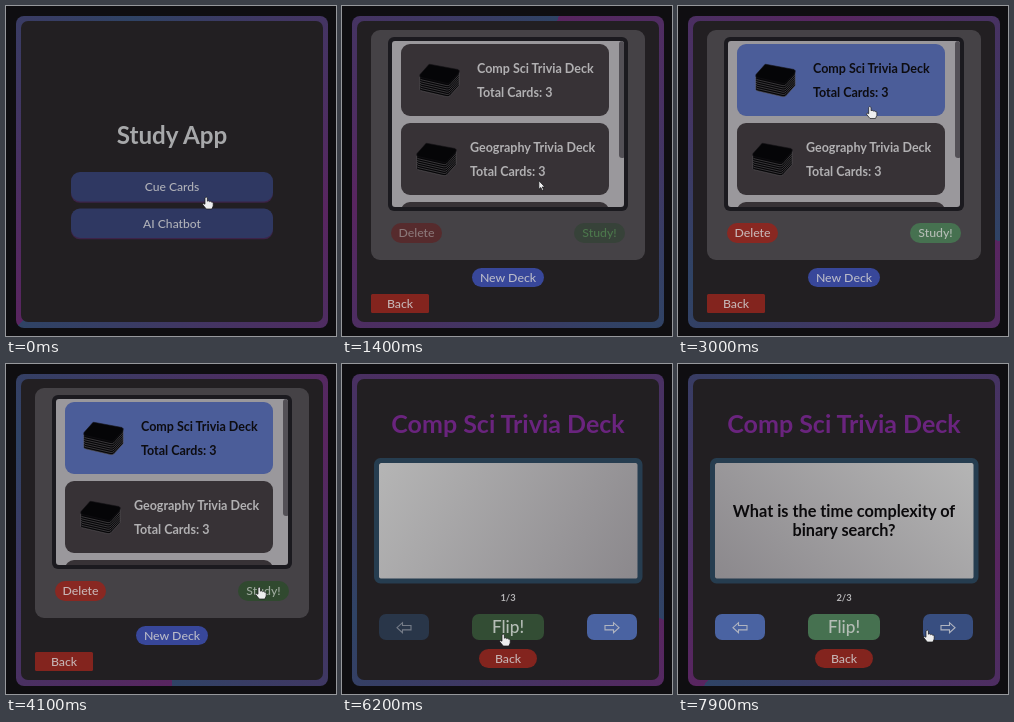
Recreate the animation shown at these times as an HTML page. Size 330x330 px, loop 8000 ms.

```html
<!DOCTYPE html>
<html lang="en">
<head>
<meta charset="utf-8">
<title>Study App</title>
<style>
  html, body { margin: 0; width: 100%; height: 100%; overflow: hidden; background: #0f0e11; }
  #frame, #inside, #paper { position: absolute; }
  #frame { left: 9.5px; top: 9.5px; width: 312.5px; height: 312px; border-radius: 8px; }
  #inside { left: 15px; top: 15px; width: 301.5px; height: 301px; border-radius: 7px; background: #221f22; }
  #paper { left: 37px; top: 99px; width: 258.5px; height: 115.5px; border-radius: 2px; }
  svg { position: absolute; left: 0; top: 0; width: 330px; height: 330px; display: block; }
  text { font-family: Lato, "Open Sans", sans-serif; font-variant-ligatures: none; }
</style>
</head>
<body>
<div id="frame"></div>
<div id="inside"></div>
<div id="paper"></div>
<svg id="stage" viewBox="0 0 330 330">
  <defs>
    <clipPath id="listClip"><rect x="50" y="35" width="232" height="166" rx="3"/></clipPath>
  </defs>
</svg>
<script>
const LOOP = 8000;
const HOME_AT = -3750, DECKS_AT = 1100, SELECT_AT = 2700, STUDY_AT = 4200;
const FLIP_AT = 6050, ANSWER_AT = 6400, NEXT_AT = 7350;
const TURN = 6000;

const stage = document.getElementById('stage');
const frame = document.getElementById('frame');
const paper = document.getElementById('paper');

function add(parent, tag, attrs, content) {
  const node = document.createElementNS('http://www.w3.org/2000/svg', tag);
  for (const key in attrs) node.setAttribute(key, attrs[key]);
  if (content) node.textContent = content;
  parent.appendChild(node);
  return node;
}
const group = (parent, attrs) => add(parent, 'g', attrs);
const box = (parent, x, y, width, height, rx, fill, more) =>
  add(parent, 'rect', { x, y, width, height, rx, fill, ...more });
const label = (parent, x, y, size, fill, content, weight = 500, anchor = 'middle') =>
  add(parent, 'text', { x, y, fill, 'font-size': size, 'font-weight': weight, 'text-anchor': anchor }, content);
const show = (node, on) => node.setAttribute('display', on ? 'inline' : 'none');
const paint = (node, fill) => node.setAttribute('fill', fill);

function button(parent, x, y, w, h, r, fill, content, size, color = '#b9b9bd') {
  return {
    shape: box(parent, x, y, w, h, r, fill),
    text: label(parent, x + w / 2, y + h / 2 + size * 0.36, size, color, content)
  };
}

// Home
const home = group(stage);
label(home, 166, 138, 24.2, '#a7a8aa', 'Study App', 700);
for (const [y, name] of [[166, 'Cue Cards'], [202.5, 'AI Chatbot']]) {
  box(home, 65, y + 0.8, 202, 30, 9, '#3d2347');
  button(home, 65, y, 202, 29.5, 9, '#2f3862', name, 12.1, '#b0b1b8');
}

// Deck list
const decks = group(stage);
box(decks, 29, 24, 274, 230, 9, '#454246');
box(decks, 46, 31, 240, 174, 6, '#1b1a1f');
box(decks, 50, 35, 232, 166, 3, '#9a989c');
const list = group(decks, { 'clip-path': 'url(#listClip)' });

function stackIcon(parent, x, y) {
  const icon = group(parent, { transform: `translate(${x} ${y})`, 'stroke-linejoin': 'round' });
  for (let i = 6; i >= 0; i--) {
    add(icon, 'path', {
      d: 'M12 1 L39 6 Q41 7 40 9 L31 19 Q30 20 28 20 L2 14 Q0 13 1 11 L9 2 Q10 0 12 1Z',
      transform: `translate(0 ${i * 2.2})`, fill: '#050507',
      stroke: i ? '#5b585c' : '#151417', 'stroke-width': 0.6
    });
  }
}
function deckCard(y, textX, iconX, name) {
  const shape = box(list, 59, y, 208, 72, 9, '#373236');
  stackIcon(list, iconX, y + 19.5);
  const lines = [[name, 28.5], ['Total Cards: 3', 52.5]].map(([content, dy]) =>
    label(list, textX, y + dy, 12.5, '#b1b0b2', content, 700, 'start'));
  return { shape, lines };
}
const compSci = deckCard(38, 135, 77, 'Comp Sci Trivia Deck');
deckCard(117, 128, 74, 'Geography Trivia Deck');
box(list, 59, 196, 208, 72, 9, '#373236');
box(list, 277, 35, 6, 117, 3, '#535056');

const remove = button(decks, 49, 217, 51, 20, 10, '#562b2d', 'Delete', 12.3);
const study = button(decks, 232, 217, 51, 20, 10, '#374239', 'Study!', 12.3);
button(decks, 130, 262, 72, 19, 9.5, '#38479a', 'New Deck', 12.3, '#b9bac8');
button(decks, 29, 288, 58, 19, 1.5, '#83241e', 'Back', 12.3, '#c5b4b4');

// Study view
const cards = group(stage);
label(cards, 166, 69, 25, '#6a247e', 'Comp Sci Trivia Deck', 700);
box(cards, 34.5, 96.5, 263.5, 120.5, 4, 'none', { stroke: '#263d50', 'stroke-width': 5 });
const faces = [
  [[162.5, 'What does HTML stand for?']],
  [[162.5, 'HyperText Markup Language']],
  [[153, 'What is the time complexity of'], [172, 'binary search?']]
].map(lines => {
  const side = group(cards);
  lines.forEach(([y, content]) => label(side, 166, y, 16.3, '#0b0a0c', content, 700));
  return side;
});
const counter = label(cards, 166, 237.4, 9.4, '#b4b3b5', '1/3', 700);

function arrowButton(x, direction) {
  const shape = box(cards, x, 250, 50, 26, 7, '#4a63a2');
  const arrow = add(cards, 'path', {
    d: 'M-7 0 L-1.5 -5 V-2.2 H7 V2.2 H-1.5 V5Z',
    transform: `translate(${x + 25} 263.7) scale(${direction} 1)`,
    fill: 'none', stroke: '#b0b4c0', 'stroke-width': 1.1
  });
  return { shape, arrow };
}
const previous = arrowButton(37, 1);
const next = arrowButton(245, -1);
const flip = button(cards, 130, 250, 72, 26, 7, '#467150', 'Flip!', 17.2, '#b5bdb6');
button(cards, 137, 285, 58, 19, 9.5, '#83241e', 'Back', 12.3, '#c5b4b4');

// Pointer
const pointer = group(stage);
const outline = { fill: '#eeeeef', stroke: '#18171a', 'stroke-width': 0.7 };
const hand = add(pointer, 'path', {
  d: 'M-1 1 Q0 -1 1.4 1 V4.2 Q2.6 3.3 3.5 4.6 Q4.7 3.9 5.5 5.1 Q7 4.6 7.2 6.3 V9 L5.8 12 H0.3 L-3.3 7.6 Q-3 5.8 -1 7.2Z',
  ...outline
});
const arrow = add(pointer, 'path', {
  d: 'M0 0 V8.6 L2 6.8 L3.4 9.8 L4.8 9.2 L3.4 6.3 H6Z',
  ...outline
});

// [time, x, y]
const route = [
  [0, 200, 191], [600, 199, 189], [1000, 198, 186], [1200, 198, 186],
  [2100, 189, 97], [2900, 189, 95], [3700, 250, 220], [4100, 253, 223],
  [4350, 253, 223], [5200, 226, 175], [5400, 224, 178], [5850, 162, 268],
  [6200, 161, 270], [6650, 163, 269], [7150, 249, 266], [LOOP, 249, 266]
];
const ease = k => k * k * (3 - 2 * k);

function pointerAt(t) {
  const i = Math.max(1, route.findIndex(p => p[0] >= t));
  const [t0, x0, y0] = route[i - 1], [t1, x1, y1] = route[i];
  const k = ease((t - t0) / (t1 - t0));
  return [x0 + (x1 - x0) * k, y0 + (y1 - y0) * k];
}
const over = (x, y, [left, top, w, h]) => x >= left && x <= left + w && y >= top && y <= top + h;

function render(t) {
  const [x, y] = pointerAt(t);
  const onHome = t < DECKS_AT, onStudy = t >= STUDY_AT, onDecks = !onHome && !onStudy;
  const selected = t >= SELECT_AT, second = t >= NEXT_AT;
  const turning = t >= FLIP_AT && t < ANSWER_AT;

  // The border restarts its turn whenever a view opens.
  const openedAt = onHome ? HOME_AT : onDecks ? DECKS_AT : STUDY_AT;
  const angle = (t - openedAt) * 360 / TURN;
  const blue = '#2f4365', purple = '#592560';
  frame.style.background = `conic-gradient(from ${angle}deg, ${purple}, ${blue}, ${purple}, ${blue})`;
  paper.style.background = `linear-gradient(${angle}deg, #b5b5b5, #8b888c)`;
  paper.style.display = onStudy ? 'block' : 'none';

  show(home, onHome);
  show(decks, onDecks);
  show(cards, onStudy);

  paint(compSci.shape, selected ? '#4b5d99' : '#373236');
  compSci.lines.forEach(line => paint(line, selected ? '#0d0c10' : '#b1b0b2'));
  const overStudy = onDecks && over(x, y, [232, 217, 51, 20]);
  paint(remove.shape, selected ? '#892822' : '#562b2d');
  paint(remove.text, selected ? '#c7b5b5' : '#8b7778');
  paint(study.shape, !selected ? '#374239' : overStudy ? '#30492f' : '#467150');
  paint(study.text, !selected ? '#4c774c' : overStudy ? '#9fab9f' : '#b5bdb6');

  const faceIndex = second ? 2 : t >= ANSWER_AT ? 1 : 0;
  faces.forEach((side, i) => show(side, !turning && i === faceIndex));
  counter.textContent = second ? '2/3' : '1/3';
  const overFlip = onStudy && over(x, y, [130, 250, 72, 26]);
  const overNext = onStudy && over(x, y, [245, 250, 50, 26]);
  paint(flip.shape, overFlip ? '#334d34' : '#467150');
  paint(next.shape, overNext ? '#384e80' : '#4a63a2');
  paint(previous.shape, second ? '#4a63a2' : '#293649');
  previous.arrow.setAttribute('stroke', second ? '#b0b4c0' : '#747b87');

  const overHome = onHome && over(x, y, [65, 166, 202, 30]);
  const overDeck = onDecks && over(x, y, [59, 38, 208, 72]);
  const clickable = overHome || overDeck || overStudy || overFlip || overNext;
  show(hand, clickable);
  show(arrow, !clickable);
  pointer.setAttribute('transform', `translate(${x.toFixed(2)} ${y.toFixed(2)})`);
}

const start = performance.now();
function tick(now) {
  render(Math.max(0, now - start) % LOOP);
  requestAnimationFrame(tick);
}
render(0);
requestAnimationFrame(tick);
</script>
</body>
</html>
```
